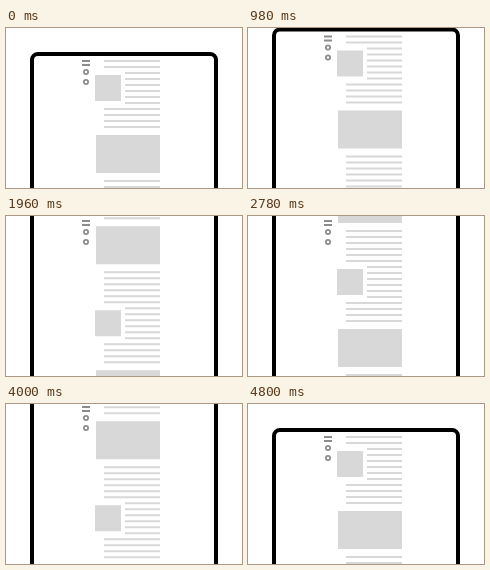
Write an HTML page that moves like this. It is 236 px wide and 160 px high and loops after 4.92 s.

```html
<!DOCTYPE html>
<html lang="en">
<head>
<meta charset="utf-8">
<title>Sticky icons beside a scrolling page</title>
<style>
  @property --scroll { syntax: "<length>"; inherits: true; initial-value: 0px; }
  @property --dip { syntax: "<length>"; inherits: true; initial-value: 0px; }

  html, body {
    margin: 0;
    width: 100%;
    height: 100%;
    overflow: hidden;
    background: #fff;
  }

  svg {
    display: block;
    width: 236px;
    height: 160px;
    animation: scroll 4920ms linear infinite, dip 4920ms ease-in-out infinite;
  }

  .page { transform: translateY(var(--scroll)); }

  /* Icons travel with the page until they stick near the top. */
  .icons { transform: translateY(calc(max(var(--scroll), -28px) + var(--dip))); }

  .frame { fill: none; stroke: #000; stroke-width: 4; }
  .text { fill: none; stroke: #d8d8d8; stroke-width: 2; }
  .picture { fill: #d8d8d8; }
  .icons path { stroke: #8c8c8c; stroke-width: 2; }
  .icons circle { fill: none; stroke: #8c8c8c; stroke-width: 1.8; }

  @keyframes scroll {
    0% { --scroll: 0px; }
    7.317% { --scroll: 0px; animation-timing-function: cubic-bezier(.52, .24, .71, 1); }
    56.504%, 73.577% { --scroll: -138px; }
    73.577% { animation-timing-function: cubic-bezier(.35, .25, .7, 1); }
    95.732%, 100% { --scroll: 0px; }
  }

  @keyframes dip {
    0%, 73.577% { --dip: 0px; }
    81.301% { --dip: -2px; }
    88.923%, 100% { --dip: 0px; }
  }
</style>
</head>
<body>
<svg viewBox="0 0 236 160">
  <defs>
    <g id="section">
      <path class="text" d="M98 33h56m-56 6h56
        M119 45h35m-35 6h35m-35 6h35m-35 6h35m-35 6h35m-35 6h35
        M98 81h56m-56 6h56m-56 6h56m-56 6h56
        M98 153h56m-56 6h56m-56 6h56m-56 6h56"/>
      <rect class="picture" x="89" y="47" width="26" height="26"/>
      <rect class="picture" x="90" y="107" width="64" height="38"/>
    </g>
  </defs>
  <g class="page">
    <rect class="frame" x="26" y="26" width="184" height="400" rx="6"/>
    <use href="#section"/>
    <use href="#section" y="144"/>
  </g>
  <g class="icons">
    <path d="M76 33h8m-8 4h8"/>
    <circle cx="80" cy="44" r="2.1"/>
    <circle cx="80" cy="54" r="2.1"/>
  </g>
</svg>
</body>
</html>
```
